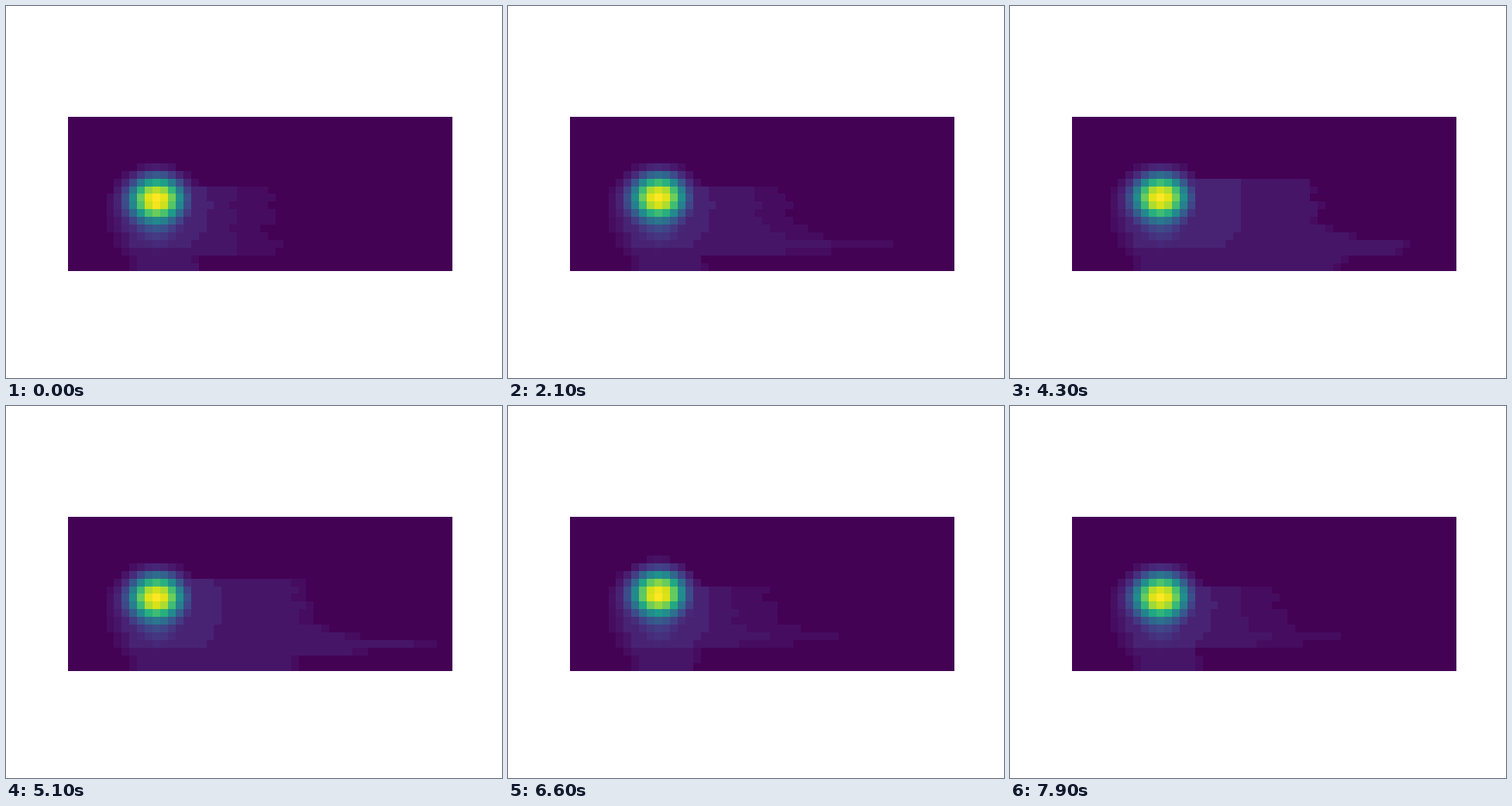
Animation, 640 px wide and 480 px high, one loop 8 s. Source, as a matplotlib script:

```python
import numpy as np
import matplotlib.pyplot as plt
from matplotlib.animation import FuncAnimation

ROWS, COLS = 20, 50
FRAMES, STEP = 80, 100
AIR, FAINT, HAZE, GLOW = 0.006, 0.034, 0.057, 0.1

# Key points: step, core row, gust strength, jet reach, jet row.
POSES = np.array([
    [0, 10.05, 0.1, 29, 16.4],
    [21, 9.8, 0.4, 43, 16],
    [30, 9.4, 0.65, 51, 16],
    [43, 9.8, 1.0, 51, 16.4],
    [51, 9.8, 0.9, 50, 16],
    [66, 9.35, 0.0, 36, 15],
    [79, 9.7, 0.1, 36, 15],
])

yy, xx = np.mgrid[:ROWS, :COLS]
row = yy[:, :1]


def bell(cx, cy, sx, sy):
    return np.exp(-((xx - cx) / sx) ** 2 / 2 - ((yy - cy) / sy) ** 2 / 2)


def core(cy):
    """Flat-topped hot spot with a soft halo that sinks below it."""
    radius = np.hypot((xx - 11.05) / 2.9, (yy - cy) / 2.45)
    spot = 0.5 ** radius ** 2.6
    halo = 0.2 * bell(10.7, cy + 1.5, 3.3, 2.4)
    sink = 0.12 * bell(11.2, 15, 2.2, 1.7)
    field = spot + halo + sink
    field /= field.max()
    return np.where(field > 0.03, field, AIR)


def plume(t, gust, jet, jet_row):
    """Haze drifting right: a broad lobe, a thin jet and a foot below."""
    lobe = 26 + 6 * gust
    reach = lobe - 0.12 * (row - 11) ** 2
    reach = np.where(row > 13, lobe - 1, reach)
    reach = reach + (jet - lobe) * np.exp(-abs(row - jet_row) / 1.2)
    foot = 16.5 + 19 * gust ** 3
    reach = np.where(row > jet_row + 1.5, foot, reach)
    reach = reach + 0.6 * np.sin(2.1 * row + 0.8 * t)

    inner = 16 + (reach - 16) * (0.5 + 0.45 * gust)
    fringe = 18.5 - 0.1 * (row - 11) ** 2 + 4 * gust ** 8
    left = np.rint(5 + 0.07 * (row - 12) ** 2)
    below = row >= np.rint(9.3 - 1.3 * gust)

    field = np.full((ROWS, COLS), AIR)
    for start, end, level in ((left, reach, FAINT), (left + 1, inner, HAZE),
                              (left + 2, fringe, GLOW)):
        inside = below & (xx >= start) & (xx < np.rint(end))
        if level == GLOW:
            inside &= row <= 16
        field[inside] = level
    return field


def heat(t):
    cy, gust, jet, jet_row = (np.interp(t, POSES[:, 0], column)
                              for column in POSES.T[1:])
    return np.maximum(core(cy), plume(t, gust, jet, jet_row))


fig, ax = plt.subplots(figsize=(6.4, 4.8), dpi=100)
ax.axis("off")
image = ax.imshow(heat(0), cmap="viridis", vmin=0, vmax=1,
                  interpolation="nearest")


def update(i):
    image.set_data(heat(i))
    return [image]


anim = FuncAnimation(fig, update, frames=FRAMES, interval=STEP,
                     repeat=True, repeat_delay=0)
plt.show()
```
